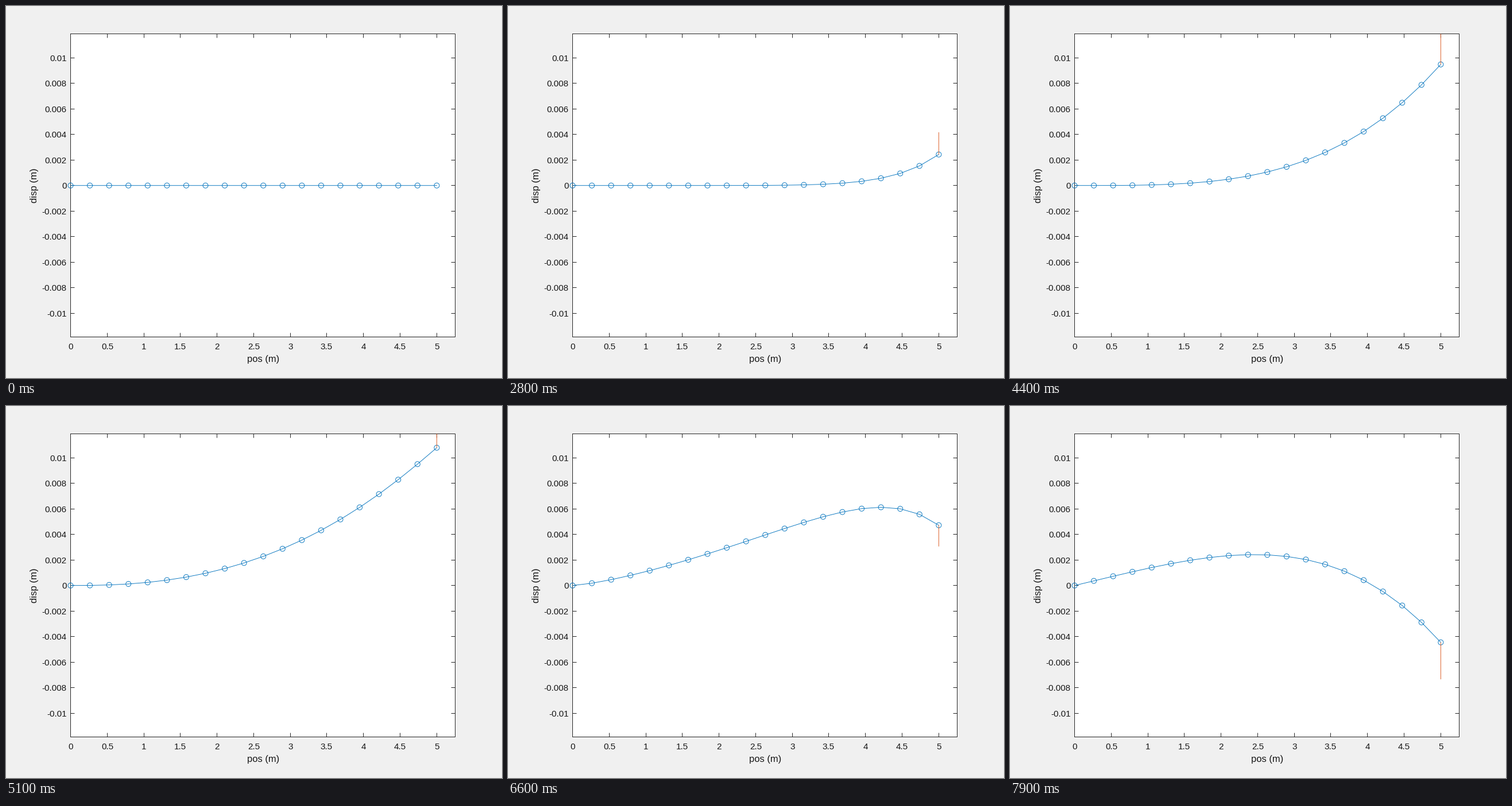
These frames come from a looping animation (864 px wide and 648 px high, 8000 ms). A matplotlib script:

```python
import numpy as np
import matplotlib.pyplot as plt
from matplotlib.animation import FuncAnimation
from matplotlib.patches import Circle, Polygon, Rectangle

WIDTH, HEIGHT, DPI = 864, 648, 72
LEFT, RIGHT, TOP, BOTTOM = 112.5, 782.5, 48.5, 576.5
ZERO_Y, PX_PER_M, PX_PER_DISP = 312.7, 127.57, 22260
INK, TEXT, BLUE, ORANGE, GRAY = "#262626", "#161616", "#0072BD", "#D95319", "#858585"
FRAMES, INTERVAL = 80, 100
TOOLBAR_ON, TOOLBAR_OFF = 0.7, 2.5
SECOND_WAVE = 3.5

plt.rcParams["font.family"] = "Liberation Sans"
plt.rcParams["path.snap"] = False


def smooth(keys, t):
    """Cubic curve through (time, value) keys, starting at rest."""
    xs, ys = np.array(keys, float).T
    h = np.diff(xs)
    s = np.diff(ys) / h
    inner = (s[:-1] * h[1:] + s[1:] * h[:-1]) / (h[1:] + h[:-1])
    limit = 3 * np.minimum(abs(s[:-1]), abs(s[1:]))
    inner = np.where(s[:-1] * s[1:] >= 0, np.clip(inner, -limit, limit), inner)
    d = np.concatenate([[0], inner, s[-1:]])

    t = np.clip(t, xs[0], xs[-1])
    i = np.clip(np.searchsorted(xs, t, side="right") - 1, 0, len(h) - 1)
    u = (t - xs[i]) / h[i]
    return (ys[i] * (1 + 2 * u) * (1 - u) ** 2 + ys[i + 1] * u * u * (3 - 2 * u)
            + h[i] * (d[i] * u * (1 - u) ** 2 + d[i + 1] * u * u * (u - 1)))


def profile(t, xi):
    """A pulse entering at the tip: a steep power law that relaxes to a line."""
    steepness = np.exp(0.18 * (8 - t) ** 1.5)
    return xi ** steepness


# Tip heights in pixels of the upward pulse and the downward one after it.
RISE = [(0, 0), (1.3, 4), (2.8, 54), (4.4, 211), (5.1, 242), (6.6, 212), (7.9, 156)]
FALL = [(4, 0), (5.1, 2), (6.6, 107), (7.9, 255)]


def heights(t, xi):
    return (smooth(RISE, t) * profile(t, xi)
            - smooth(FALL, t) * profile(t - SECOND_WAVE, xi))


def end_force(t):
    return (56 + 2.5 * t) * np.sin(0.0844 * t * t)


def pixel(v):
    return np.floor(v) + 0.5


xi = np.linspace(0, 1, 20)
node_x = LEFT + 5 * xi * PX_PER_M

fig = plt.figure(figsize=(WIDTH / DPI, HEIGHT / DPI), dpi=DPI, facecolor="#f0f0f0")
ax = fig.add_axes([0, 0, 1, 1])
ax.set_xlim(0, WIDTH)
ax.set_ylim(HEIGHT, 0)
ax.axis("off")


def line(xs, ys, color=INK, lw=1.0, **style):
    return ax.plot(xs, ys, color=color, lw=lw, **style)[0]


def label(x, y, text, size=15.3, ha="center", **style):
    ax.text(x, y, text, fontsize=size, color=TEXT, ha=ha, va="baseline", **style)


def draw_axes():
    ax.add_patch(Rectangle((LEFT, TOP), RIGHT - LEFT, BOTTOM - TOP,
                           fc="white", ec=INK, lw=1, zorder=0))
    for k in range(11):
        x = pixel(LEFT + k * 0.5 * PX_PER_M)
        line([x, x], [BOTTOM, BOTTOM - 6.5])
        line([x, x], [TOP, TOP + 6.5])
        label(x, 598.5, f"{k / 2:g}")
    for k in range(-5, 6):
        y = pixel(ZERO_Y - k * 0.002 * PX_PER_DISP)
        line([LEFT, LEFT + 6.5], [y, y])
        line([RIGHT, RIGHT - 6.5], [y, y])
        label(105.8, y + 5.7, f"{k * 0.002:g}", ha="right")
    label(448, 620, "pos (m)", 16.5)
    label(54, ZERO_Y, "disp (m)", 16.7, rotation=90, rotation_mode="anchor")


def draw_toolbar():
    parts = []

    def stroke(points, lw=1.8):
        parts.append(line(*zip(*points), color=GRAY, lw=lw, solid_joinstyle="round"))

    def shape(points, fill=True):
        parts.append(ax.add_patch(Polygon(points, fc=GRAY if fill else "none",
                                          ec=GRAY, lw=1.7, joinstyle="round")))

    # share
    stroke([(570, 35), (570, 41), (589, 41), (589, 37)])
    a = np.linspace(0, np.pi / 2, 12)
    stroke(list(zip(587 - 13 * np.cos(a), 36 - 10 * np.sin(a))), 2)
    stroke([(583, 21), (589, 26), (583, 32)], 2)
    shape([(590, 42), (593, 42), (593, 39)])
    # brush
    shape([(614, 20), (619, 20), (619, 31), (614, 31)], False)
    shape([(611, 31), (622, 31), (623, 35), (609, 35)], False)
    shape([(609, 37), (623, 37), (623, 43), (604, 43)])
    # data tip
    shape([(633, 20), (655, 20), (655, 43), (633, 43), (633, 35),
           (636, 31.5), (633, 28)], False)
    stroke([(639, 28), (651, 28)])
    stroke([(639, 35), (651, 35)])
    # hand
    shape([(669, 43), (663, 32), (663, 29), (666, 29), (669, 32), (666, 23),
           (669, 21), (672, 29), (672, 20), (675, 19), (677, 28), (679, 20),
           (682, 21), (681, 30), (684, 25), (687, 26), (683, 38), (682, 43)], False)
    # zoom in and out
    for x in (703, 734):
        parts.append(ax.add_patch(Circle((x, 29), 8.6, fc="none", ec=GRAY, lw=2)))
        stroke([(x + 6.5, 35.5), (x + 13.5, 43)], 3)
        stroke([(x - 4.5, 29), (x + 4.5, 29)], 2)
    stroke([(703, 24.5), (703, 33.5)], 2)
    # home
    stroke([(755, 32), (767, 20), (779, 32)], 2)
    stroke([(774.5, 20), (774.5, 26)], 2.2)
    stroke([(758, 31), (758, 43), (764, 43), (764, 35), (770, 35),
            (770, 43), (776, 43), (776, 31)])
    return parts


draw_axes()
toolbar = draw_toolbar()
string = line([], [], BLUE, 0.9, zorder=4)
masses = [ax.add_patch(Circle((x, ZERO_Y), 4.5, fc="none", ec=BLUE, lw=0.9, zorder=4))
          for x in node_x]
force = line([], [], ORANGE, 0.9, solid_capstyle="butt", zorder=5)


def update(i):
    t = i * INTERVAL / 1000
    ys = ZERO_Y - heights(t, xi)
    string.set_data(node_x, ys)
    for mass, x, y in zip(masses, node_x, ys):
        mass.center = x, y
    force.set_data([node_x[-1]] * 2, [ys[-1], max(ys[-1] - end_force(t), TOP)])
    for part in toolbar:
        part.set_visible(TOOLBAR_ON <= t < TOOLBAR_OFF)
    return [string, force, *masses, *toolbar]


anim = FuncAnimation(fig, update, frames=FRAMES, interval=INTERVAL, repeat=True)
plt.show()
```
